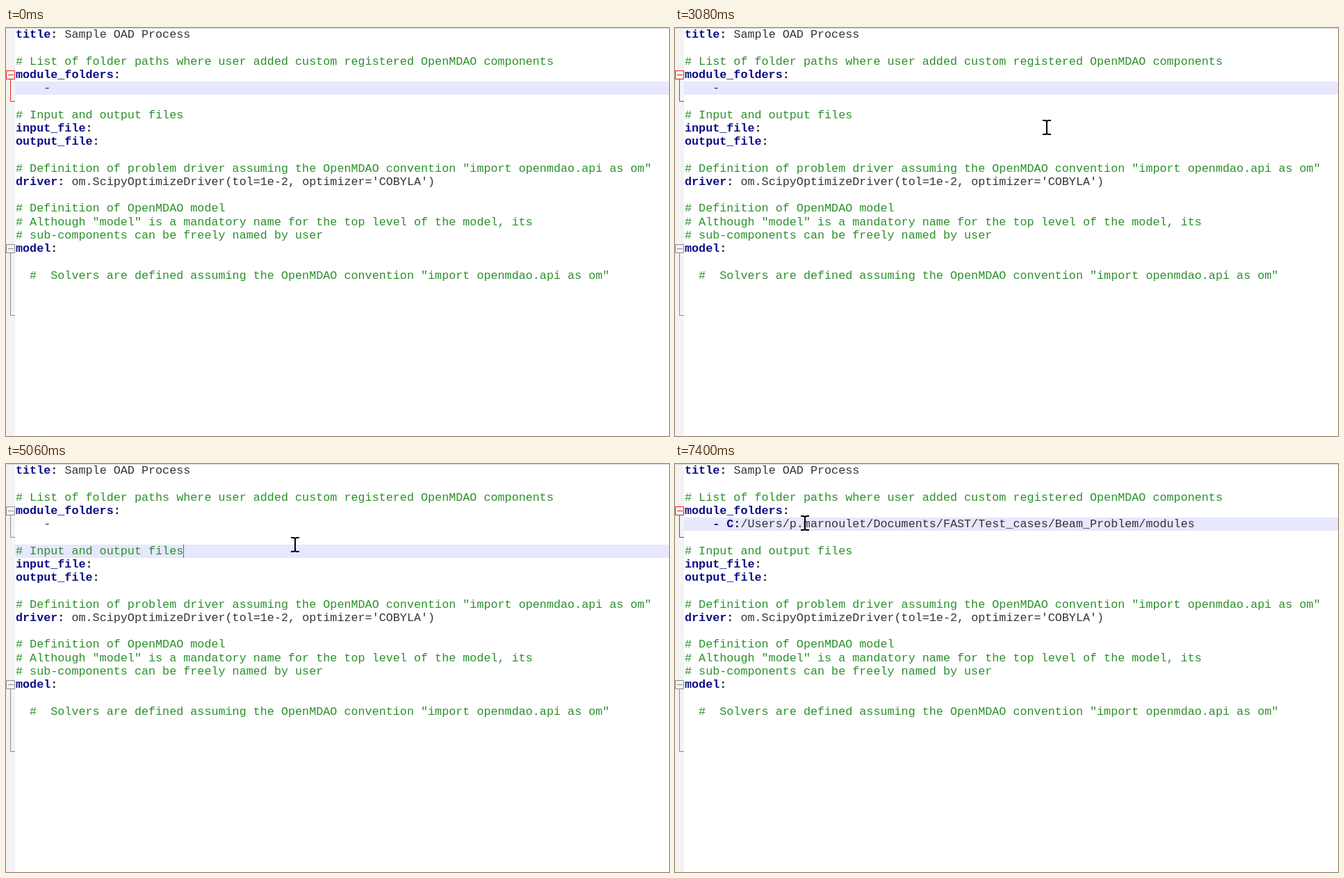
An HTML page that plays this animation: 954x587 px, repeating every 8 s.

```html
<!DOCTYPE html>
<html lang="en">
<head>
<meta charset="utf-8">
<title>YAML editor</title>
<style>
html, body { margin: 0; width: 100%; height: 100%; overflow: hidden; background: #fff; }
svg { display: block; width: 954px; height: 587px; }
text { font: 16.75px "Liberation Mono", "Courier New", monospace; white-space: pre; fill: #333; }
.key, .op { font-weight: bold; }
.key { fill: #0c0c86; }
.op { fill: #1c1c1c; }
.note { fill: #2a902a; }
.fold { fill: none; stroke: #8a8a8a; }
</style>
</head>
<body>
<svg viewBox="0 0 954 587">
  <rect width="954" height="587" fill="#fff"/>
  <rect width="13" height="587" fill="#f3f3f3"/>
  <rect width="954" height="1" fill="#d6d6d6"/>
  <rect id="active" x="13" width="941" height="19" fill="#e7e7fe"/>
  <path id="fold" class="fold" d="M.5 61.5h12v12H.5zM3 67.5h8M6.5 73.5v32H13"/>
  <path class="fold" d="M.5 311.5h12v12H.5zM3 317.5h8M6.5 323.5v90H13"/>
  <g id="code"></g>
  <rect id="caret" width="1" height="19" fill="#9038f4"/>
  <g id="mouse">
    <circle id="click" cx="-2.5" cy="-1.3" r="15" fill="#f9f14e"/>
    <path id="beam" fill="none" stroke-width="2" d="M-6-10H-2L0-9 2-10H6M0-9V9M-6 10H-2L0 9 2 10H6"/>
  </g>
</svg>
<script>
const LOOP = 8000, LEFT = 14, CHAR = 10.05, PITCH = 19.23;
const STEP = 90, BLINK = 560, PRESS = 80, PASTE = 6460;
const $ = id => document.getElementById(id);

const span = (cls, s) => `<tspan class="${cls}">${s}</tspan>`;
const note = s => span('note', s);
const pair = (key, value = '') => span('key', key) + span('op', ':') + value;

function addLine(row, col, html) {
  const el = document.createElementNS('http://www.w3.org/2000/svg', 'text');
  el.setAttribute('x', LEFT + col * CHAR);
  el.setAttribute('y', row * PITCH + 14.4);
  el.innerHTML = html;
  $('code').append(el);
  return el;
}

const convention = 'assuming the OpenMDAO convention "import openmdao.api as om"';
const path = '/Users/p.marnoulet/Documents/FAST/Test_cases/Beam_Problem/modules';
const page = [
  pair('title', ' Sample OAD Process'),
  '',
  note('# List of folder paths where user added custom registered OpenMDAO components'),
  pair('module_folders'),
  '',
  '',
  note('# Input and output files'),
  pair('input_file'),
  pair('output_file'),
  '',
  note('# Definition of problem driver ' + convention),
  pair('driver', " om.ScipyOptimizeDriver(tol=1e-2, optimizer='COBYLA')"),
  '',
  note('# Definition of OpenMDAO model'),
  note('# Although "model" is a mandatory name for the top level of the model, its'),
  note('# sub-components can be freely named by user'),
  pair('model'),
  '',
  note('  #  Solvers are defined ' + convention)
];
page.forEach((html, row) => html && addLine(row, 0, html));
const emptyItem = addLine(4, 4, '-');
const pathItem = addLine(4, 4, pair('- C', path));

// Each glide eases the pointer on from where the last one ended
const entry = { x: 826, y: 583 };
const glides = [
  { from: 170, to: 350, x: 778, y: 523 },
  { from: 2330, to: 2330, x: 740.5, y: 501.5 },
  { from: 2420, to: 2780, x: 409, y: 146 },
  { from: 2870, to: 3080, x: 535, y: 143 },
  { from: 3650, to: 3730, x: 531, y: 141 },
  { from: 3920, to: 4020, x: 496, y: 135 },
  { from: 4120, to: 4120, x: 492.5, y: 133.5 },
  { from: 4580, to: 5060, x: 416, y: 116 },
  { from: 5150, to: 5240, x: 409, y: 131 },
  { from: 5340, to: 5630, x: 194, y: 87 },
  { from: 5710, to: 5710, x: 187, y: 85 }
];

// Where the caret sits and when its blink turns on
const edits = [
  { from: 0, row: 4 },
  { from: 4120, row: 6, col: 24, on: 3930, click: true },
  { from: 5630, row: 4, col: 6, on: 5630, click: true },
  { from: PASTE, row: 4, col: 73, on: 6840 }
];

const show = (el, on) => el.setAttribute('visibility', on ? 'visible' : 'hidden');
const place = (el, x, y) => el.setAttribute('transform', `translate(${x} ${y})`);
const ease = p => p * p * (3 - 2 * p);

function pointer(t) {
  const i = glides.findLastIndex(g => g.from <= t);
  if (i < 0) return null;
  const a = glides[i - 1] || entry, b = glides[i];
  const count = Math.round((b.to - b.from) / STEP) + 1;
  const p = ease(Math.min(1, (Math.floor((t - b.from) / STEP) + 1) / count));
  return { x: a.x + (b.x - a.x) * p, y: a.y + (b.y - a.y) * p };
}

function draw(t) {
  const edit = edits.findLast(e => e.from <= t);
  const top = Math.round(edit.row * PITCH + 0.3);
  $('active').setAttribute('y', top);
  $('fold').style.stroke = edit.row === 4 ? '#e82020' : '';

  show(emptyItem, t < PASTE);
  show(pathItem, t >= PASTE);

  const lit = edit.col && Math.floor((t - edit.on) / BLINK) % 2 === 0;
  show($('caret'), lit);
  if (lit) place($('caret'), Math.floor(LEFT + edit.col * CHAR), top);

  const at = pointer(t);
  const pressed = edit.click && t < edit.from + PRESS;
  show($('beam'), at);
  show($('click'), pressed);
  if (at) place($('mouse'), at.x, at.y);
  $('beam').setAttribute('stroke', pressed ? '#625e14' : '#000');
}

const start = performance.now();
function tick() {
  draw((performance.now() - start) % LOOP);
  requestAnimationFrame(tick);
}
tick();
</script>
</body>
</html>
```
